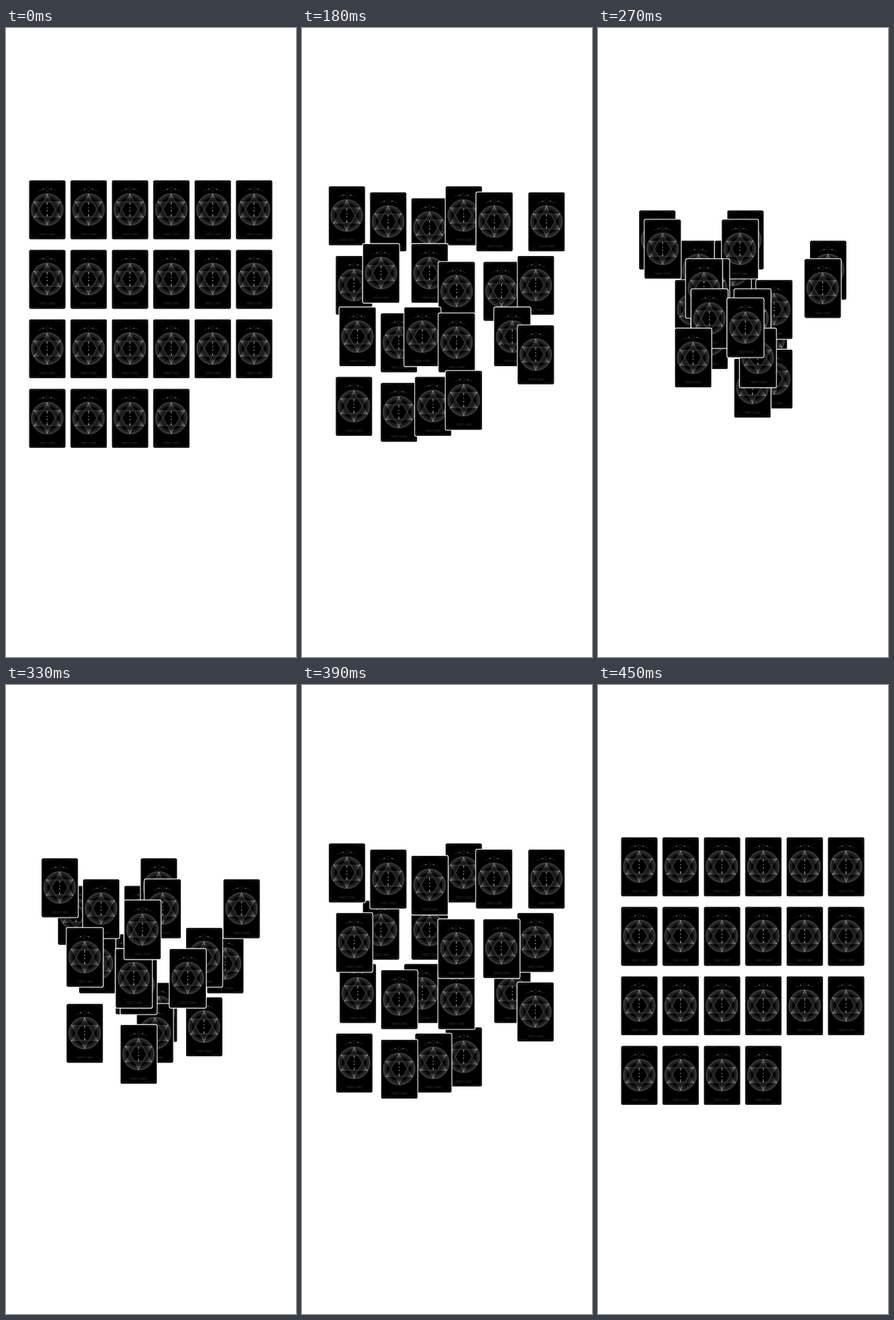
Write an HTML page that moves like this. It is 509x1101 px and loops after 960 ms.

```html
<!DOCTYPE html>
<html lang="en">
<head>
<meta charset="utf-8">
<title>Card shuffle</title>
<style>
  html, body { margin: 0; width: 100%; height: 100%; overflow: hidden; background: #fff; }
  svg { display: block; width: 100%; height: 100%; }
</style>
</head>
<body>
<svg id="stage" viewBox="0 0 509 1101">
  <defs>
    <radialGradient id="tips" gradientUnits="userSpaceOnUse" cx="0" cy="0" r="28">
      <stop offset=".4" stop-color="#fff" stop-opacity=".06"/>
      <stop offset=".65" stop-color="#fff" stop-opacity=".12"/>
      <stop offset=".9" stop-color="#fff" stop-opacity=".3"/>
      <stop offset="1" stop-color="#fff" stop-opacity=".6"/>
    </radialGradient>
    <g id="card">
      <rect x="-1.3" y="-1.3" width="66.6" height="106" rx="4" fill="#fff" opacity=".9"/>
      <rect x=".2" y=".2" width="63.6" height="103" rx="2.8" fill="#000"/>
      <rect x=".9" y=".9" width="62.2" height="101.6" rx="2.2" fill="none" stroke="#262426" stroke-width="1.4"/>
      <path d="M3 9V3H18M46 3H61V9M3 94V100.4H18M46 100.4H61V94" fill="none" stroke="#2c2c2c" stroke-width=".6"/>
      <g id="art" transform="translate(31.8 51.2)" fill="none" stroke="#fff">
        <circle r="28.2" stroke-width=".7" opacity=".34"/>
        <circle r="26.2" stroke-width="3.2" opacity=".1"/>
        <circle r="26.2" stroke-width="2.6" stroke-dasharray=".8 1" opacity=".24"/>
        <circle r="23.2" stroke-width="2" stroke-dasharray="1.3 .8" opacity=".2"/>
        <circle r="21.8" stroke-width=".5" opacity=".2"/>
      </g>
      <text x="32" y="96.3" text-anchor="middle" font-family="Inter, sans-serif" font-size="4.5" fill="#383838">TAROT CARD</text>
    </g>
  </defs>
</svg>
<script>
const stage = document.getElementById('stage');
const art = document.getElementById('art');

function add(parent, tag, attrs) {
  const el = document.createElementNS('http://www.w3.org/2000/svg', tag);
  for (const key in attrs) el.setAttribute(key, attrs[key]);
  return parent.appendChild(el);
}
const dot = (x, y, r, opacity) =>
  add(art, 'circle', { cx: x, cy: y, r, fill: '#fff', stroke: 'none', opacity });

// Emblem: hexagram, dark heart, bright tips, glyph column, arc of moons
const polar = (r, k) => [r * Math.sin(k * Math.PI / 3), -r * Math.cos(k * Math.PI / 3)];
const ring = (r, ks) => ks.map(k => polar(r, k)).join(' ');
for (const ks of [[0, 2, 4], [1, 3, 5]])
  add(art, 'polygon', { points: ring(27.4, ks), fill: 'url(#tips)', 'stroke-width': .5, 'stroke-opacity': .18 });
add(art, 'polygon', { points: ring(13.2, [0.5, 1.5, 2.5, 3.5, 4.5, 5.5]), fill: '#000', stroke: 'none' });
for (let k = 0; k < 6; k++) dot(...polar(26.4, k), .9, .4);
for (const [y, r] of [[-11, 1], [-8.6, .7], [-3, .8], [2.5, .9], [8.5, .7], [11, 1.1]]) dot(0, y, r, .75);
for (let k = 1; k <= 5; k++)
  for (const side of [-1, 1])
    dot(side * (2 + k * 2.5), -36 + k * k * .13, k === 2 ? 1 : .6, k === 2 ? .55 : .35);
add(art, 'path', { d: 'M0 -40L2.6 -35.5L0 -31L-2.6 -35.5Z', 'stroke-width': .5, opacity: .25 });

// Cards trade places in pairs
const swap = [];
for (const [a, b] of [[0, 7], [1, 14], [2, 21], [3, 8], [4, 12], [5, 16], [6, 15], [9, 18], [10, 20], [11, 13], [17, 19]]) {
  swap[a] = b;
  swap[b] = a;
}
const home = i => [40.5 + 72.6 * (i % 6), 266.5 + 121.7 * Math.floor(i / 6)];
const cards = swap.map(() => add(stage, 'use', { href: '#card' }));

const LOOP = 960, START = 150, END = 450, STEP = 30;
const phase = [.099, .2806, .458, .6296, .808, 1]; // every second step

function progress(t) {
  if (t < START) return 0;
  if (t >= END) return 1;
  const k = Math.floor((t - START) / STEP) / 2, i = Math.floor(k);
  const u = phase[i] + (phase[i + 1] - phase[i]) * (k - i);
  return .5 - .5 * Math.cos(Math.PI * u);
}

function draw(now) {
  const p = progress(now % LOOP);
  cards.forEach((card, i) => {
    const [x0, y0] = home(i), [x1, y1] = home(swap[i]);
    card.setAttribute('transform', `translate(${x0 + (x1 - x0) * p} ${y0 + (y1 - y0) * p})`);
  });
}

let begin;
function tick(now) {
  begin ??= now;
  draw(now - begin);
  requestAnimationFrame(tick);
}
draw(0);
requestAnimationFrame(tick);
</script>
</body>
</html>
```
